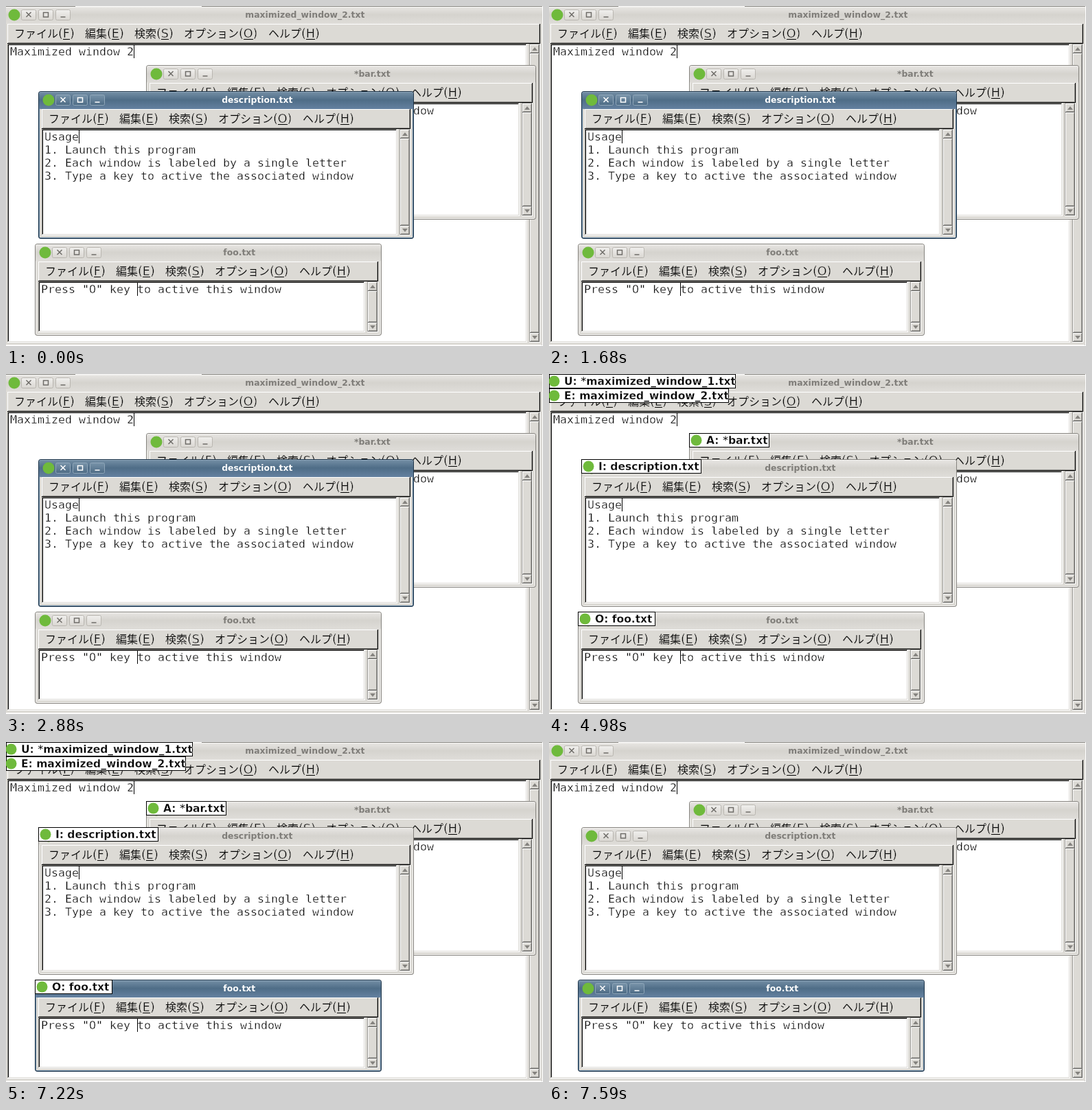
An HTML page that plays this animation: 782x495 px, repeating every 7990 ms.

```html
<!DOCTYPE html>
<html lang="ja">
<head>
<meta charset="utf-8">
<title>Window switcher</title>
<style>
html, body { margin: 0; width: 100%; height: 100%; overflow: hidden; background: #dcdad5; }
svg { display: block; width: 782px; height: 495px; }
rect { shape-rendering: crispEdges; }
text { white-space: pre; }
.round { shape-rendering: auto; }
/* A stroke in the background colour thins the letters */
.mono { font: 16.61px "DejaVu Sans Mono", monospace; stroke: #fff; stroke-width: .4; }
.kana { font: 16px "Noto Sans CJK JP", "Noto Sans CJK", sans-serif; stroke: #dcdad5; stroke-width: .2; }
.key { font: 17.5px "DejaVu Sans", sans-serif; stroke: #dcdad5; stroke-width: .5; }
.title { font: bold 12.4px "DejaVu Sans", sans-serif; text-anchor: middle; fill: #7f7d79; }
.label { font: bold 15.5px "DejaVu Sans", sans-serif; stroke: #fff; stroke-width: .35; }
.icon { fill: #6fba3c; }
.edge { fill: #85837e; }
.rim { fill: #f6f5f3; }
.bar { fill: url(#idle); }
.shine { fill: #f4f3f1; }
.btn { fill: url(#idleBtn); stroke: #b9b6b0; }
.glyph { fill: none; stroke: #6f6d69; stroke-width: 1.5; }
.on .title { fill: #fff; }
.on .edge { fill: #1d3449; }
.on .rim { fill: #5d7f9d; }
.on .bar { fill: url(#active); }
.on .shine { fill: #8ea6ba; }
.on .btn { fill: url(#activeBtn); stroke: #8fa6b9; }
.on .glyph { stroke: #fff; }
</style>
</head>
<body>
<svg id="stage" viewBox="0 0 782 495" xmlns="http://www.w3.org/2000/svg">
  <defs>
    <linearGradient id="idle" x2="0" y2="1">
      <stop offset="0" stop-color="#e6e4e1"/><stop offset=".45" stop-color="#d5d3ce"/><stop offset="1" stop-color="#dfddd9"/>
    </linearGradient>
    <linearGradient id="active" x2="0" y2="1">
      <stop offset="0" stop-color="#718ca3"/><stop offset=".45" stop-color="#4f6d87"/><stop offset="1" stop-color="#6481a0"/>
    </linearGradient>
    <linearGradient id="idleBtn" x2="0" y2="1">
      <stop offset="0" stop-color="#f0efed"/><stop offset="1" stop-color="#dad7d2"/>
    </linearGradient>
    <linearGradient id="activeBtn" x2="0" y2="1">
      <stop offset="0" stop-color="#7893a9"/><stop offset="1" stop-color="#4d6b85"/>
    </linearGradient>
  </defs>
</svg>
<script>
const BG = "#dcdad5", DARK = "#9a9995", TROUGH = "#c2c0bb", BLACK = "#000", WHITE = "#fff";
const LINE = 19, CHAR = 10, PERIOD = 7990;
const stage = document.getElementById("stage");

// Menu entries: offset, name, access key, offset of the key
const MENU = [
  [0, "ファイル", "F", 64],
  [103, "編集", "E", 32],
  [175, "検索", "S", 32],
  [247, "オプション", "O", 80],
  [370, "ヘルプ", "H", 48]
];
const KEY_WIDTH = { F: 10, E: 11, S: 11, O: 14, H: 13 };

function add(parent, name, attrs, content) {
  const node = document.createElementNS("http://www.w3.org/2000/svg", name);
  for (const k in attrs) node.setAttribute(k, attrs[k]);
  if (content) node.textContent = content;
  parent.appendChild(node);
  return node;
}

const rect = (g, x, y, width, height, fill) => add(g, "rect", { x, y, width, height, fill });
const styled = (g, cls, x, y, width, height, rx = 0) =>
  add(g, "rect", { class: cls + (rx ? " round" : ""), x, y, width, height, rx });
const write = (g, cls, x, y, s) => add(g, "text", { class: cls, x, y }, s);
const group = () => add(stage, "g", {});

// Two-pixel bevel: outer and inner tones for the lit and the shaded sides
function bevel(g, x, y, w, h, lit, litIn, shade, shadeIn, fill) {
  rect(g, x, y, w, h, shade);
  rect(g, x, y, w - 1, h - 1, lit);
  rect(g, x + 1, y + 1, w - 2, h - 2, shadeIn);
  rect(g, x + 1, y + 1, w - 3, h - 3, litIn);
  rect(g, x + 2, y + 2, w - 4, h - 4, fill);
}
const raised = (g, x, y, w, h) => bevel(g, x, y, w, h, WHITE, BG, BLACK, DARK, BG);
const sunken = (g, x, y, w, h, fill) => bevel(g, x, y, w, h, DARK, BLACK, WHITE, BG, fill);

function scrollbar(g, x, y, h) {
  sunken(g, x, y, 16, h, TROUGH);
  const slot = (top, height) => bevel(g, x + 1, top, 14, height, WHITE, BG, "#6b6a67", DARK, BG);
  slot(y + 1, 13);
  slot(y + 14, h - 28);
  slot(y + h - 14, 13);
  const cx = x + 8;
  const arrow = (tip, base) =>
    add(g, "path", { d: `M${cx} ${tip}L${cx + 4} ${base}H${cx - 4}Z`, fill: "#85837f" });
  arrow(y + 5, y + 10);
  arrow(y + h - 5, y + h - 10);
}

function titleBar(g, x, y, w, name) {
  add(g, "circle", { class: "icon", cx: x + 15, cy: y + 13, r: 8.5 });
  for (const cx of [36, 61, 86]) styled(g, "btn", x + cx - 10.5, y + 5.5, 21, 15, 2);
  const by = y + 12.5;
  add(g, "path", { class: "glyph", d: `M${x + 32.5} ${by - 3.5}l7 7m0 -7l-7 7` });
  add(g, "path", { class: "glyph", d: `M${x + 57.5} ${by - 3}h7v6.5h-7z` });
  add(g, "path", { class: "glyph", d: `M${x + 82.5} ${by + 3.5}h7` });
  write(g, "title", x + w / 2 + 45.3, y + 17, name);
}

function menuBar(g, x, y, w) {
  raised(g, x + 5, y + 26, w - 10, 29);
  for (const [dx, name, key, at] of MENU) {
    const left = x + 15 + dx, keyX = left + at;
    write(g, "kana", left, y + 46, name);
    write(g, "key", keyX, y + 46, `(${key})`);
    rect(g, keyX + 7, y + 48, KEY_WIDTH[key], 1, BLACK);
  }
}

function makeWindow(x, y, w, h, name, lines, indent = 0) {
  const g = group();
  styled(g, "edge", x, y, w, h, 4);
  styled(g, "rim", x + 1, y + 1, w - 2, h - 2, 3);
  rect(g, x + 2, y + 25, w - 4, h - 27, BG);
  styled(g, "shine", x + 1, y + 1, w - 2, 10, 3);
  styled(g, "bar", x + 1, y + 2, w - 2, 24, 2);
  titleBar(g, x, y, w, name);
  menuBar(g, x, y, w);
  sunken(g, x + 5, y + 55, w - 29, h - 60, WHITE);
  scrollbar(g, x + w - 21, y + 55, h - 60);
  lines.forEach((s, i) => write(g, "mono", x + 9 + indent * CHAR, y + 72 + i * LINE, s));
  return g;
}

const caret = (g, x, y, column) => rect(g, x + 9 + column * CHAR, y + 57, 1, LINE, BLACK);

function label(g, x, y, w, s) {
  rect(g, x, y, w, 21, BLACK);
  rect(g, Math.max(x, 0) + 1, y + 1, x + w - 2 - Math.max(x, 0), 19, WHITE);
  add(g, "circle", { class: "icon", cx: x + 10.5, cy: y + 10.5, r: 8 });
  write(g, "label", x + 25, y + 16, s);
}

const back = makeWindow(-3, 0, 786, 495, "maximized_window_2.txt", ["Maximized window 2"]);
rect(back, 101, 0, 184, 1, "#f4f3f1");
rect(back, 781, 0, 1, 495, WHITE);
rect(back, 0, 494, 782, 1, WHITE);
caret(back, -3, 0, 18);

makeWindow(204, 86, 568, 225, "*bar.txt", ["window"], 35);

const usage = makeWindow(47, 124, 547, 215, "description.txt", [
  "Usage",
  "1. Launch this program",
  "2. Each window is labeled by a single letter",
  "3. Type a key to active the associated window"
]);
const usageCaret = caret(usage, 47, 124, 5);

const foo = makeWindow(42, 346, 505, 134, "foo.txt", ['Press "O" key to active this window']);
const fooCaret = caret(foo, 42, 346, 14);

const labels = group();
label(labels, -3, 0, 275, "U: *maximized_window_1.txt");
label(labels, -3, 21, 265, "E: maximized_window_2.txt");
label(labels, 204, 86, 117, "A: *bar.txt");
label(labels, 47, 124, 175, "I: description.txt");
label(labels, 42, 346, 113, "O: foo.txt");

const BLINKS = [[80, 480], [1280, 1680], [2480, 2880], [3680, 4070]];
const show = (node, on) => { node.style.visibility = on ? "visible" : "hidden"; };

function draw() {
  const t = performance.now() % PERIOD;
  usage.setAttribute("class", t < 4980 ? "on" : "");
  foo.setAttribute("class", t >= 7220 ? "on" : "");
  show(labels, t >= 4980 && t < 7270);
  show(usageCaret, !BLINKS.some(([a, b]) => t >= a && t < b));
  show(fooCaret, t < 7590);
  requestAnimationFrame(draw);
}
draw();
</script>
</body>
</html>
```
